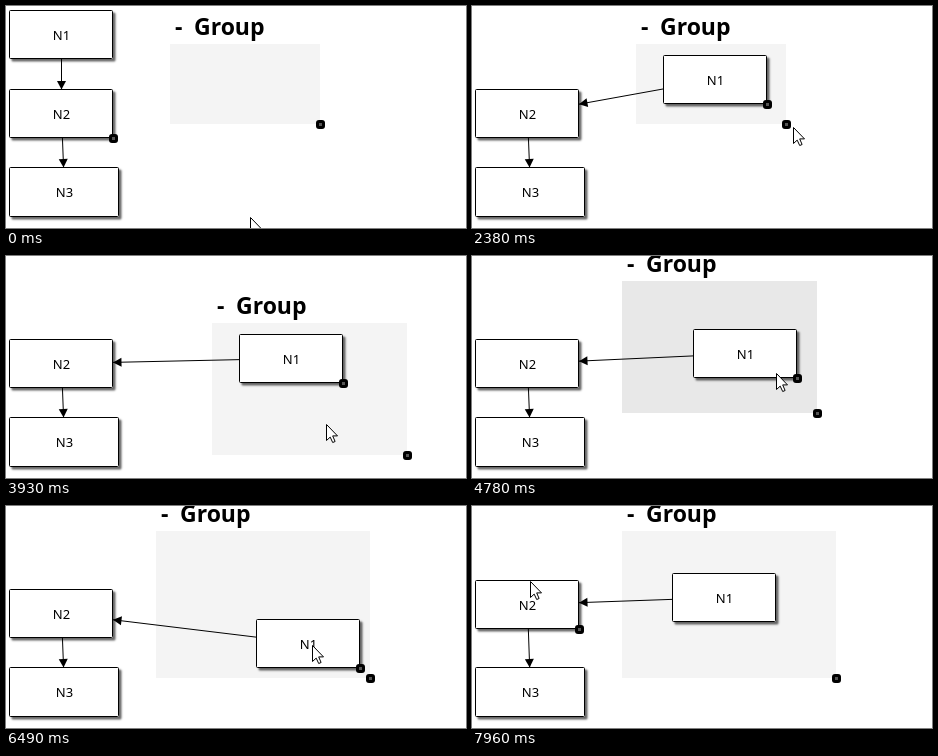
An HTML page with a canvas that plays this animation: 460x222 px, repeating every 8000 ms.

```html
<!DOCTYPE html>
<html lang="en">
<head>
<meta charset="utf-8">
<title>Grouping nodes</title>
<style>
html, body { margin: 0; width: 100%; height: 100%; overflow: hidden; background: #fff; }
canvas { display: block; }
</style>
</head>
<body>
<canvas id="stage" width="460" height="222"></canvas>
<script>
const ctx = document.getElementById('stage').getContext('2d');
const LOOP = 8000, STEP = 77.6, PHASE = 1130, PAD = 11;
const FONT = '"Noto Sans", "Open Sans", sans-serif';

// The pointer goes to (x, y) between two times, taking a held part along.
const move = (from, to, x, y, held) => ({ from, to, x, y, held });
const gestures = [
  move(70, 650, 95, 38),
  move(800, 1125, 184, 66, 'n1'),
  move(1140, 1600, 283, 83, 'n1'),
  move(1830, 2375, 322, 121),
  move(2390, 2530, 312, 111),
  move(2740, 3160, 357, 163, 'corner'),
  move(3300, 3630, 279, 139),
  move(3640, 3925, 321, 168, 'group'),
  move(3940, 4160, 265, 126, 'group'),
  move(4300, 4560, 261, 80),
  move(4650, 4775, 305, 117, 'n1'),
  move(4790, 5160, 334, 157, 'n1'),
  move(5690, 5940, 318, 147),
  move(6230, 6340, 307, 139),
  move(6500, 7050, 257, 93, 'n1'),
  move(7270, 7720, 59, 84),
  move(7740, 7955, 59, 75, 'n2')
];

const node = (label, x, y, w = 103, h = 48) => ({ label, x, y, w, h });
const ease = p => (1 - Math.cos(Math.PI * Math.min(1, p))) / 2;

function shift(part, dx, dy) {
  part.x += dx;
  part.y += dy;
}

// Replays all gestures begun before t.
function sceneAt(t) {
  const s = {
    pointer: { x: 245, y: 211 },
    group: { x: 164, y: 38, w: 150, h: 80 },
    n1: node('N1', 3, 4), n2: node('N2', 3, 83), n3: node('N3', 3, 161, 109, 49)
  };
  const { pointer, group, n1 } = s;
  s.active = s.n2;
  for (const { from, to, x, y, held } of gestures) {
    if (t < from) break;
    const p = ease((t - from) / (to - from));
    const dx = Math.round((x - pointer.x) * p), dy = Math.round((y - pointer.y) * p);
    shift(pointer, dx, dy);
    s.held = held;
    if (held === 'corner') {
      group.w += dx;
      group.h += dy;
    } else if (held === 'group') {
      shift(group, dx, dy);
      shift(n1, dx, dy);
    } else if (held) {
      s.active = s[held];
      shift(s.active, dx, dy);
    } else if (n1.x > group.x) {
      // A dropped node makes its group grow to fit.
      group.w = Math.max(group.w, n1.x + n1.w + PAD - group.x);
      group.h = Math.max(group.h, n1.y + n1.h + PAD - group.y);
    }
  }
  return s;
}

function text(str, x, y, font, align) {
  ctx.font = font + ' ' + FONT;
  ctx.textAlign = align;
  ctx.fillStyle = '#000';
  ctx.fillText(str, x, y);
}

function polygon(points) {
  ctx.beginPath();
  points.forEach(([x, y]) => ctx.lineTo(x, y));
  ctx.closePath();
}

function box(x, y, w, h, r) {
  ctx.beginPath();
  ctx.roundRect(x, y, w, h, r);
}

function drawGroup({ x, y, w, h }, lit) {
  ctx.fillStyle = lit ? '#e8e8e8' : '#f4f4f4';
  ctx.fillRect(x, y, w, h);
  text('-', x + 5, y - 9, '700 23px', 'left');
  text('Group', x + 24, y - 9, '700 23px', 'left');
}

function drawNode({ label, x, y, w, h }) {
  ctx.save();
  ctx.shadowColor = 'rgba(0,0,0,0.6)';
  ctx.shadowBlur = 2;
  ctx.shadowOffsetX = ctx.shadowOffsetY = 2.5;
  ctx.fillStyle = '#fff';
  box(x, y, w + 1, h + 1, 1.5);
  ctx.fill();
  ctx.restore();
  ctx.strokeStyle = '#000';
  ctx.lineWidth = 1;
  box(x + 0.5, y + 0.5, w, h, 1);
  ctx.stroke();
  text(label, x + w / 2 + 1, y + 30, '13px', 'center');
}

function drawHandle(x, y) {
  ctx.fillStyle = '#000';
  box(x - 4, y - 4, 9, 9, 3);
  ctx.fill();
  ctx.fillStyle = '#555';
  ctx.fillRect(x - 1, y - 1, 3, 3);
}

const center = n => [n.x + n.w / 2 + 1, n.y + n.h / 2 + 0.5];

// Where the ray from the node's center along (dx, dy) leaves its box.
function border(n, dx, dy) {
  const [cx, cy] = center(n);
  const k = Math.min(n.w / 2 / Math.abs(dx || 1e-6), n.h / 2 / Math.abs(dy || 1e-6));
  return [cx + dx * k, cy + dy * k];
}

function drawEdge(a, b) {
  const [ax, ay] = center(a), [bx, by] = center(b);
  const dx = bx - ax, dy = by - ay;
  const [sx, sy] = border(a, dx, dy), [ex, ey] = border(b, -dx, -dy);
  ctx.fillStyle = ctx.strokeStyle = '#000';
  ctx.lineWidth = 1;
  if (Math.hypot(ex - sx, ey - sy) < 8) {
    // Too short for a head: it flips upwards.
    polygon([[sx, ey - 8], [sx - 4.5, ey], [sx + 4.5, ey]]);
    ctx.fill();
    return;
  }
  ctx.beginPath();
  ctx.moveTo(sx, sy);
  ctx.lineTo(ex, ey);
  ctx.stroke();
  ctx.save();
  ctx.translate(ex, ey);
  ctx.rotate(Math.atan2(dy, dx));
  polygon([[0, 0], [-8.5, -4.5], [-8.5, 4.5]]);
  ctx.fill();
  ctx.restore();
}

function drawPointer({ x, y }) {
  ctx.save();
  ctx.translate(x - 0.5, y + 0.5);
  polygon([[0, 0], [0, 16], [3.7, 12.6], [6.2, 18], [8.6, 17], [6.2, 11.4], [11, 11.4]]);
  ctx.fillStyle = '#fff';
  ctx.strokeStyle = '#000';
  ctx.lineWidth = 1;
  ctx.fill();
  ctx.stroke();
  ctx.restore();
}

function draw(t) {
  const { pointer, group, n1, n2, n3, active, held } = sceneAt(t);
  ctx.fillStyle = '#fff';
  ctx.fillRect(0, 0, 460, 222);
  drawGroup(group, held === 'n1' && n1.x > group.x);
  [n3, n2, n1].forEach(drawNode);
  drawEdge(n1, n2);
  drawEdge(n2, n3);
  drawHandle(group.x + group.w, group.y + group.h);
  drawHandle(active.x + active.w + 1, active.y + active.h + 1);
  drawPointer(pointer);
}

const snap = t => Math.max(0, PHASE + Math.floor((t - PHASE) / STEP) * STEP + 8);

const start = performance.now();
function tick() {
  draw(snap((performance.now() - start) % LOOP));
  requestAnimationFrame(tick);
}
tick();
</script>
</body>
</html>
```
